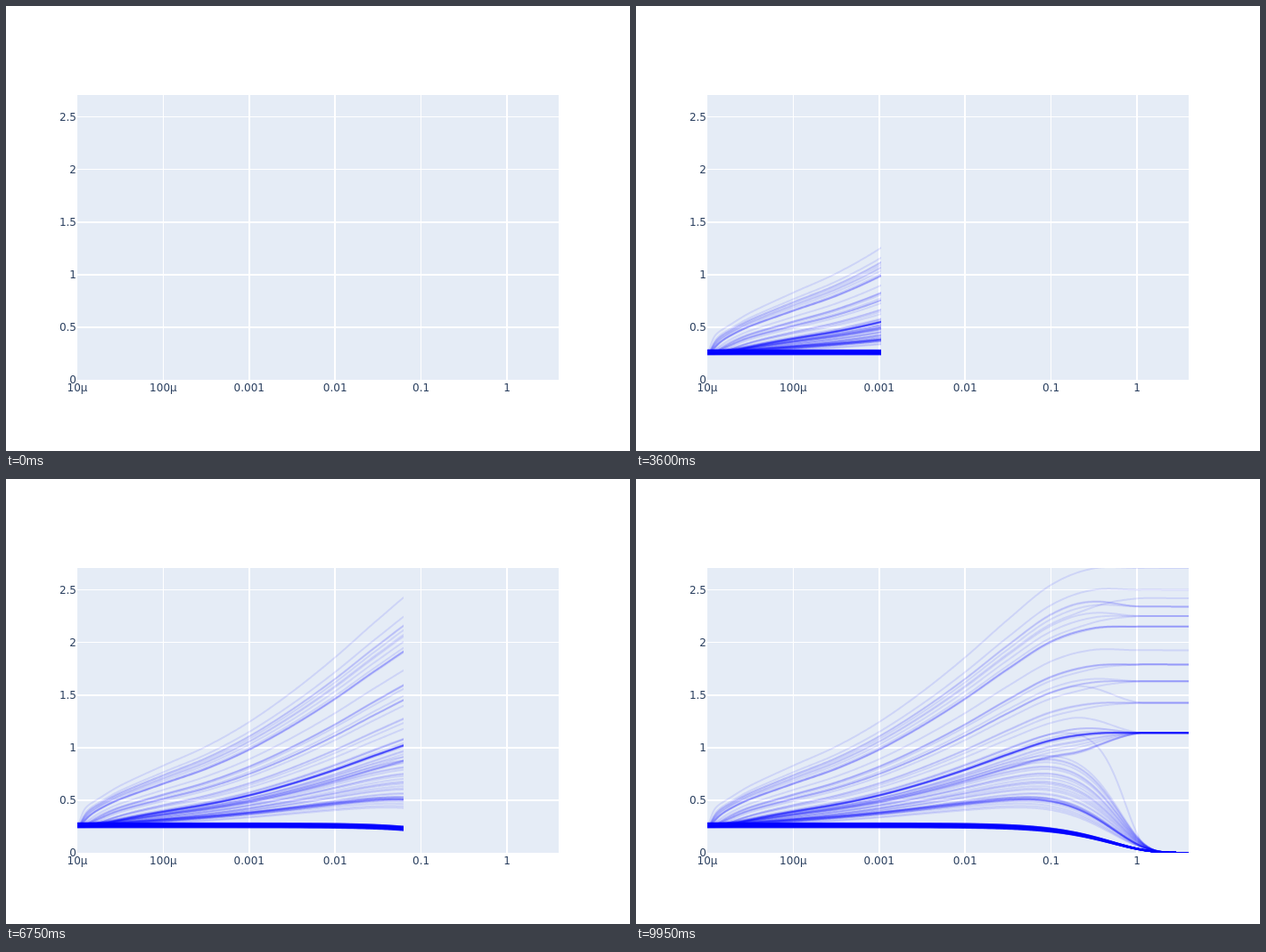
An HTML page with a canvas for the animation above (10000 ms loop, 700 px wide and 500 px high).

```html
<!DOCTYPE html>
<html>
<head>
<meta charset="utf-8">
<style>
  html, body { margin: 0; width: 100%; height: 100%; overflow: hidden; background: #fff; }
  svg { position: absolute; left: 0; top: 0; }
  text { font: 12px "DejaVu Sans", Verdana, sans-serif; fill: #2a3f5f; }
  #reveal { position: absolute; left: 80px; top: 100px; width: 0; height: 320px; overflow: hidden; }
  canvas { display: block; }
</style>
</head>
<body>
<svg id="axes" width="700" height="500"></svg>
<div id="reveal"><canvas id="plot" width="540" height="320"></canvas></div>
<script>
const WIDTH = 540, HEIGHT = 320, STEPS = 199, FRAME = 50;
const DECADE = WIDTH / (5 + Math.log10(4)), UNIT = 118.2;

// Axes: grid lines are [position, thickness]
const rect = (x, y, w, h, fill) =>
  `<rect x="${x}" y="${y}" width="${w}" height="${h}" fill="${fill}"/>`;
const label = (x, y, anchor, s) => `<text x="${x}" y="${y}" text-anchor="${anchor}">${s}</text>`;
const columns = [[176, 1], [272, 2], [368, 2], [465, 1], [561, 2]];
const rows = [[360, 2], [301, 2], [242, 2], [183, 1], [124, 1]];
document.getElementById('axes').innerHTML =
  rect(80, 100, WIDTH, HEIGHT, '#e5ecf6') +
  columns.map(([x, w]) => rect(x, 100, w, HEIGHT, '#fff')).join('') +
  rows.map(([y, h]) => rect(80, y, WIDTH, h, '#fff')).join('') +
  ['10μ', '100μ', '0.001', '0.01', '0.1', '1']
    .map((s, i) => label(80 + i * DECADE, 433, 'middle', s)).join('') +
  [0, 0.5, 1, 1.5, 2, 2.5].map(v => label(79, 424.3 - v * UNIT, 'end', v)).join('');

let seed = 7;
const random = () => (seed = (seed * 16807) % 2147483647) / 2147483647;
const between = (a, b) => a + (b - a) * random();

// Common growth profile, one knot per half decade
const KNOTS = [0.15, 0.233, 0.303, 0.37, 0.455, 0.56, 0.68, 0.812, 0.932, 0.992, 1, 1, 1];
function growth(u) {
  const i = Math.floor(u * 2), f = u * 2 - i;
  const knot = j => KNOTS[Math.max(0, Math.min(KNOTS.length - 1, j))];
  const [a, b, c, d] = [i - 1, i, i + 1, i + 2].map(knot);
  return b + f / 2 * (c - a + f * (2 * a - 5 * b + 4 * c - d + f * (3 * (b - c) + d - a)));
}

function smoothstep(lo, hi, v) {
  const t = Math.max(0, Math.min(1, (v - lo) / (hi - lo)));
  return t * t * (3 - 2 * t);
}

// Start value fading out, blended with growth towards an amplitude
function rise(u, start, amp, end) {
  const s = growth(u);
  const ramp = 1 - Math.exp(-(1.5 + 1.4 * amp ** 3) * u);
  const goal = amp + (end - amp) * smoothstep(4.2, 5.1, u);
  const grown = goal * s * ramp * Math.min(amp, 1) ** (-0.25 * (1 - s));
  const p = 1.2 + 1.4 * amp;
  const base = start * Math.exp(-2 * 10 ** (u - 5));
  return (base ** p + grown ** p) ** (1 / p);
}
const decay = (u, rate, power) => Math.exp(-rate * 10 ** ((u - 5) * power));

const ctx = document.getElementById('plot').getContext('2d');
ctx.strokeStyle = 'rgba(0,0,255,0.1)';
ctx.lineWidth = 2;
ctx.lineJoin = 'round';
function draw(value) {
  ctx.beginPath();
  for (let i = 0; i <= STEPS * 2; i++) {
    const x = WIDTH * i / (STEPS * 2);
    ctx.lineTo(x, HEIGHT - UNIT * value(x / DECADE));
  }
  ctx.stroke();
}

const startValue = () => between(0.243, 0.282);
function drawRise(amp, end) {
  const start = startValue();
  draw(u => rise(u, start, amp, end));
}
function drawHump(amp, power) {
  const start = startValue();
  draw(u => rise(u, start, amp, amp) * decay(u, 1.9, power));
}

// Curves that settle: [amplitude, final level, count]
[
  [2.74, 2.707, 1], [2.53, 2.5, 1], [2.33, 2.42, 1], [2.43, 2.34, 2], [2.38, 2.34, 1],
  [2.31, 2.25, 1], [2.26, 2.25, 1], [2.19, 2.25, 1], [2.15, 2.15, 4], [1.95, 1.925, 1],
  [1.79, 1.79, 3], [1.76, 1.79, 1], [1.68, 1.63, 1], [1.63, 1.63, 2], [1.58, 1.63, 1],
  [1.63, 1.425, 1], [1.43, 1.425, 2], [1.39, 1.425, 1], [1.32, 1.14, 1], [1.21, 1.14, 2],
  [1.14, 1.14, 9]
].forEach(([amp, end, count]) => {
  for (let i = 0; i < count; i++) drawRise(amp + between(-0.008, 0.008), end);
});
for (let i = 0; i < 12; i++) drawRise(between(0.94, 1.17), 1.14);

// Curves that rise and die out, then the ones that only fade
drawHump(1.22, 2.2);
for (let i = 0; i < 26; i++) {
  const amp = 0.43 + 0.63 * (i + random()) / 26;
  drawHump(amp, 0.9 + 0.5 * amp);
}
for (let i = 0; i < 9; i++) drawHump(between(0.52, 0.58), 1.15);
for (let i = 0; i < 110; i++) {
  const start = between(0.241, 0.282);
  draw(u => start * decay(u, 1.93, 1));
}

const reveal = document.getElementById('reveal');
function tick() {
  const step = Math.floor(performance.now() / FRAME) % (STEPS + 1);
  reveal.style.width = WIDTH * step / STEPS + 'px';
  requestAnimationFrame(tick);
}
tick();
</script>
</body>
</html>
```
